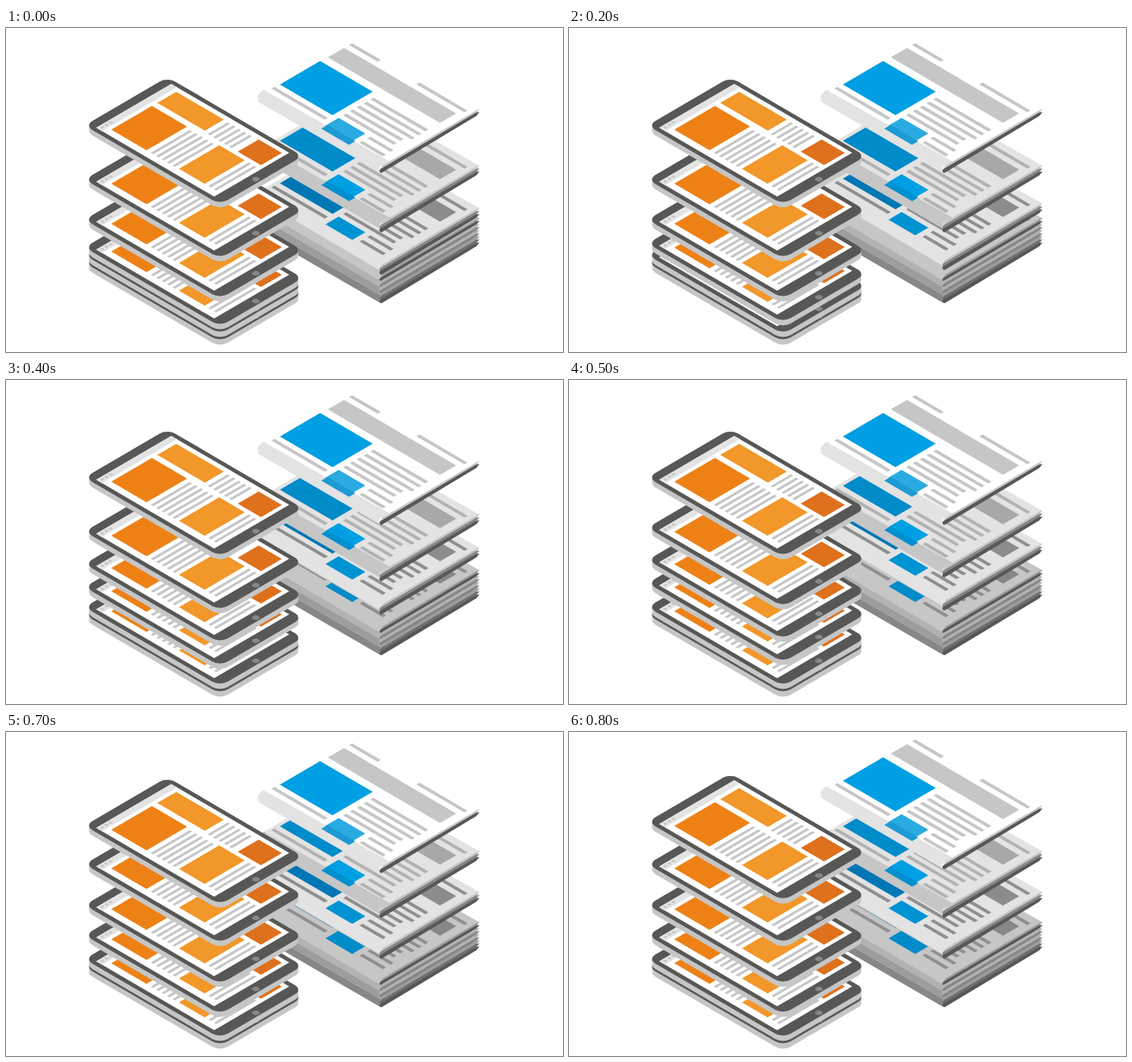
An HTML page for the animation above (1000 ms loop, 720 by 420 pixels).

```html
<!DOCTYPE html>
<html lang="en">
<head>
<meta charset="utf-8">
<title>Tablets and newspapers</title>
<style>
  html, body { margin: 0; width: 100%; height: 100%; overflow: hidden; background: #fff; }
  svg { display: block; width: 720px; height: 420px; }
</style>
</head>
<body>
<svg id="stage" viewBox="0 0 720 420" xmlns="http://www.w3.org/2000/svg"></svg>
<script>
const LOOP = 1000;
const SLOPE = 0.586;
const STEPS = [0, 200, 300, 400, 500, 600, 700, 800];

// Vertical offsets per step, top item first; a single value stays put.
const PAPER_Y = [
  [0, 0, 0, 0, 0, 0, -5, -10],
  [73, 73, 73, 69, 64, 54, 49, 49],
  [128, 122, 117, 112, 107, 102, 102, 102],
  [141]
];
const TABLET_Y = [
  [0, 0, 0, 0, 0, 0, -5, -10],
  [70, 70, 70, 70, 65, 50, 45, 45],
  [122, 122, 117, 112, 107, 98, 98, 98],
  [158, 153, 148, 142, 137, 137, 137, 137],
  [168],
  [178]
];

const PAPERS = [
  { surface: '#fff', fold: '#e3e3e3', side: ['#e3e3e3'], band: '#c6c6c6', line: '#c6c6c6',
    big: '#009fe3', small: '#29abe2', bend: '#1d9ad3', layers: ['#c6c6c6', '#575756'] },
  { surface: '#e3e3e3', fold: '#c6c6c6', side: ['#c6c6c6'], band: '#a8a8a8', line: '#b2b2b2',
    big: '#008bc9', small: '#009fe3', bend: '#0090d0', layers: ['#c6c6c6', '#878787', '#575756'] },
  { surface: '#e3e3e3', fold: '#e3e3e3', side: ['#c6c6c6'], band: '#8c8c8c', line: '#8f8f8f',
    big: '#0077b4', small: '#0093d3', layers: ['#c6c6c6', '#878787', '#575756'] },
  { surface: '#c6c6c6', fold: '#c6c6c6', side: ['#b2b2b2', '#9d9d9d', '#878787'], band: '#878787', line: '#8f8f8f',
    big: '#0077b4', small: '#008bc9',
    layers: ['#9d9d9d', '#575756', '#b2b2b2', '#878787', '#b2b2b2', '#878787', '#9d9d9d', '#6f6f6e', '#575756'] }
];

// u runs down-right and v runs up-right on the isometric plane.
const iso = (x, y, content) =>
  `<g transform="matrix(1 ${SLOPE} 1 ${-SLOPE} ${x} ${y})">${content}</g>`;
const rect = (u0, u1, v0, v1, fill, r = 0) =>
  `<rect x="${u0}" y="${v0}" width="${u1 - u0}" height="${v1 - v0}" rx="${r}" fill="${fill}"/>`;
const path = (d, fill) => `<path d="${d}" fill="${fill}"/>`;
const series = (count, make) => Array.from({ length: count }, (_, i) => make(i)).join('');

function tablet() {
  const body = (dy, fill) => iso(101.6, 126.3 + dy, rect(0, 175, 0, 107, fill, 10));
  const column = (count, u, v0, v1) =>
    series(count, i => rect(u + i * 7, u + i * 7 + 3.2, v0, v1, '#c6c6c6'));
  const screen =
    rect(10, 162.5, 5, 102, '#fff') +
    rect(10, 17.5, 5, 102, '#e3e3e3') +
    series(3, i => rect(12, 15, 8 + i * 5.2, 11 + i * 5.2, '#c6c6c6')) +
    rect(22, 67.5, 12.5, 65, '#ee8116') +
    rect(22, 83.5, 72, 96.5, '#f29729') +
    rect(109, 142, 13, 65, '#f29729') +
    rect(128, 158, 70, 97, '#df701c') +
    column(5, 73, 12.5, 63) +
    column(5, 89, 70, 96) +
    column(2, 147, 13, 65);
  return series(4, i => body(7 - i * 2, '#c6c6c6')) + body(0, '#575756') +
    iso(101.6, 126.3, screen) +
    '<ellipse cx="323" cy="196" rx="5" ry="3" fill="#878787"/>';
}

function paper(p) {
  const layer = 4;
  const depth = p.layers.length * layer;
  const stacked = p.side.length > 1;
  const sideHeight = (stacked ? depth - 5 : 3) / p.side.length;
  const sides = p.side.map((fill, i) => {
    const top = i * sideHeight;
    return path(`M326 ${88 + top}Q322 ${92 + top} 330 ${95 + top}L483 ${184 + top}v${sideHeight}L330 ${95 + top + sideHeight}Q322 ${90 + top + sideHeight} 326 ${88 + top}Z`, fill);
  }).join('');
  const edges = p.layers.map((fill, i) => {
    const y = i * layer;
    return path(`M483 ${179.5 + y}L608 ${105.5 + y}L612 ${105 + y}L608 ${110 + y}L486 ${183.5 + y}Q482 ${184.5 + y} 483 ${179.5 + y}Z`, fill);
  }).join('');
  const print =
    rect(-2, 66, 30, 82, p.big) +
    rect(-1, 144, 91, 112, p.band) +
    rect(-1, 36, 118.5, 122.5, p.line) +
    rect(86, 148, 118.5, 122.5, p.line) +
    rect(-3, 66, 20, 24, p.line) +
    series(5, i => rect(73, 144 - (i > 2 ? 6 : 0), 72 - i * 8.8, 76 - i * 8.8, p.line)) +
    series(2, i => rect(114, 144, 27 - i * 10, 31 - i * 10, p.line)) +
    rect(73, 107.5, 14, 31, p.small) +
    (p.bend ? rect(73.5, 109.5, 8, 16, p.bend) : '');
  return sides + edges +
    path('M448 13L611 105L487 178L483 184L330 95Q320 88 334 80Z', p.surface) +
    path('M334 80Q319 88 330 96L483 186Q481 180 487 178L496 173L345 87Q336 83 334 80Z', p.fold) +
    iso(326, 92, print);
}

const stage = document.getElementById('stage');
const group = (name, content) => `<g id="${name}">${content}</g>`;
stage.innerHTML =
  PAPERS.map((p, i) => group('paper' + i, paper(p))).reverse().join('') +
  TABLET_Y.map((_, i) => group('tablet' + i, tablet())).reverse().join('');

const movers = [['paper', PAPER_Y], ['tablet', TABLET_Y]].flatMap(([name, rows]) =>
  rows.map((offsets, i) => ({ node: document.getElementById(name + i), offsets })));

function draw(time) {
  const step = STEPS.filter(start => start <= time % LOOP).length - 1;
  for (const { node, offsets } of movers) {
    node.setAttribute('transform', `translate(0 ${offsets[step] ?? offsets[0]})`);
  }
}

const start = performance.now();
function tick() {
  draw(performance.now() - start);
  requestAnimationFrame(tick);
}
tick();
</script>
</body>
</html>
```
